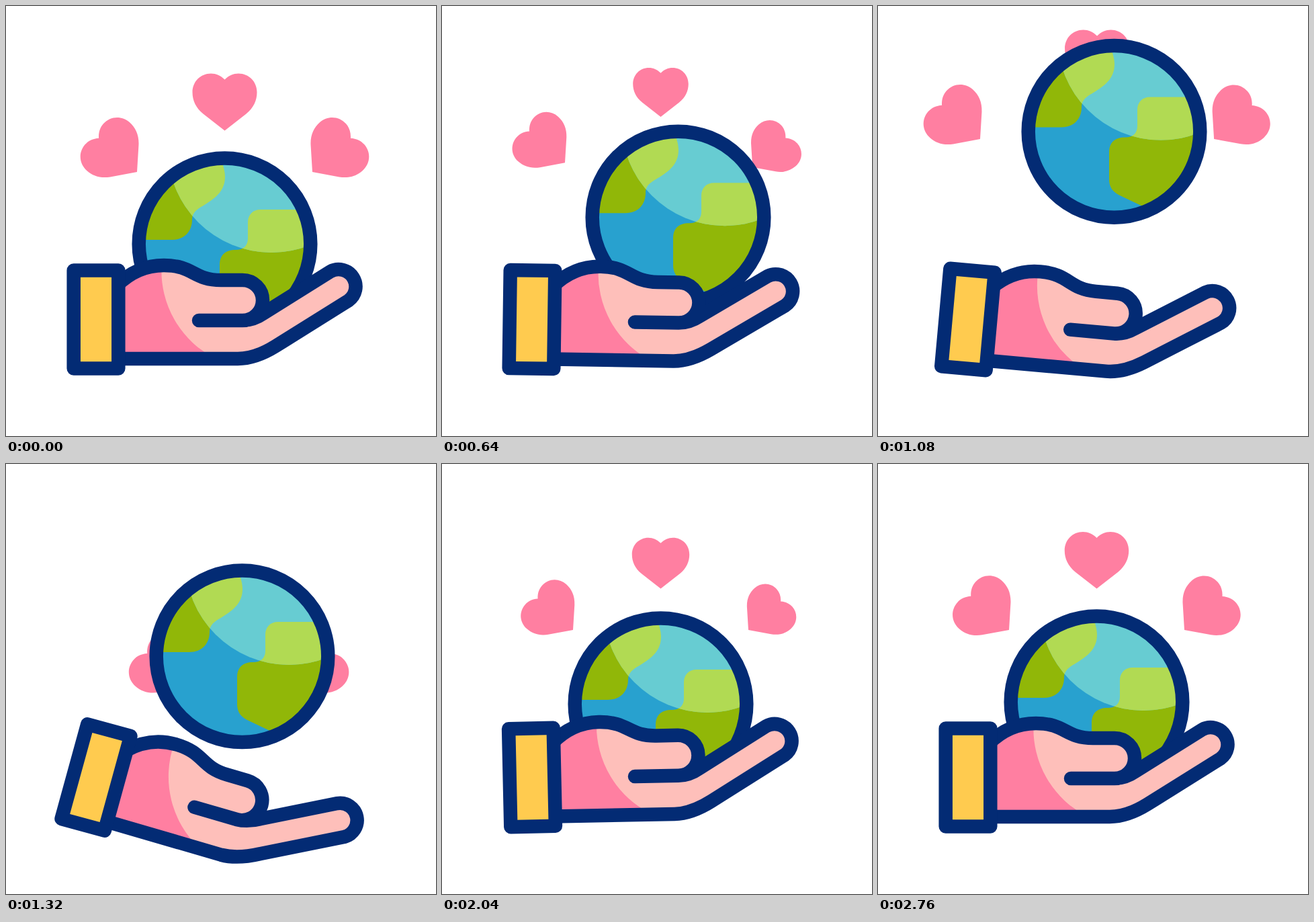
These frames come from a looping animation (640x640 px, 3000 ms). An HTML page:

```html
<!DOCTYPE html>
<html lang="en">
<head>
<meta charset="utf-8">
<title>Earth in a caring hand</title>
<style>
  html, body { margin: 0; width: 100%; height: 100%; overflow: hidden; background: #fff; }
  svg { display: block; width: 100%; height: 100%; }
  .line { fill: none; stroke: #032b74; stroke-width: 20.5; stroke-linejoin: round; stroke-linecap: round; }
  .heart { fill: #ff7fa1; }
</style>
</head>
<body>
<svg viewBox="0 0 640 640">
  <defs>
    <path id="heart" d="M0 0L-32-25C-43-34-48-45-48-57C-48-73-36-85-20.5-85C-13-85-6-82 0-76C6-82 13-85 20.5-85C36-85 48-73 48-57C48-45 43-34 32-25Z"/>
    <g id="land">
      <path d="M200 348H247C267 348 277 334 277 318C277 304 290 300 300 293C312 285 326 275 326 254C326 245 323 238 321 230H200Z"/>
      <path d="M460 303H379C367 303 360 311 360 322V346C360 357 353 363 342 363C326 363 318 371 318 385V425C318 436 322 443 333 449L375 469L460 460Z"/>
    </g>
    <clipPath id="ball"><circle cx="325.5" cy="354.3" r="123"/></clipPath>
    <clipPath id="shine"><circle cx="395" cy="213" r="154"/></clipPath>
  </defs>

  <use class="heart" href="#heart"/>
  <use class="heart" href="#heart"/>
  <use class="heart" href="#heart"/>

  <g id="globe">
    <g clip-path="url(#ball)">
      <circle cx="325.5" cy="354.3" r="123" fill="#28a1cf"/>
      <use href="#land" fill="#91b708"/>
      <g clip-path="url(#shine)">
        <circle cx="325.5" cy="354.3" r="123" fill="#67ccd2"/>
        <use href="#land" fill="#b1da53"/>
      </g>
    </g>
    <circle class="line" cx="325.5" cy="354.3" r="127.8"/>
  </g>

  <g id="hand">
    <path id="skin" fill="#febfba"/>
    <path fill="#ff7fa1" d="M165 416C185 396 209 386 231.6 386A146.6 146.6 0 0 0 312 525H165Z"/>
    <path id="outline" class="line"/>
  </g>
  <g id="cuff">
    <rect class="line" x="100.7" y="393.5" width="66.6" height="146" style="fill:#ffcb4f"/>
  </g>
</svg>
<script>
const LOOP = 3000, STEP = 40, END = 2760;
const $ = id => document.getElementById(id);
const move = (el, transform) => el.setAttribute('transform', transform);
const mix = (a, b, u) => a + (b - a) * u;

// Eased progress from 0 to 1 between two times.
const ease = (t, from, to) => {
  const u = Math.min(1, Math.max(0, (t - from) / (to - from)));
  return (1 - Math.cos(Math.PI * u)) / 2;
};

// Wrist and finger angles: dip, throw, catch, overshoot, settle.
const poses = [
  { at: 0, wrist: 0, finger: 0 },
  { at: 450, wrist: 16.3, finger: 13.5 },
  { at: 760, wrist: -6.7, finger: -5.6 },
  { at: 1380, wrist: 15.9, finger: 4.6 },
  { at: 1710, wrist: -3.1, finger: 2.1 },
  { at: 2300, wrist: 0, finger: 0 }
];

function poseAt(t) {
  const i = poses.findLastIndex(p => p.at <= t);
  const a = poses[i], b = poses[i + 1] || a;
  const u = a === b ? 0 : ease(t, a.at, b.at);
  return { wrist: mix(a.wrist, b.wrist, u), finger: mix(a.finger, b.finger, u) };
}

// The globe dips with the hand, flies on a parabola and is caught.
const THROW = 493, CATCH = 1490, APEX = 1000;
const globeX = t => 26 * (ease(t, 0, 450) - ease(t, CATCH, 1720));
function globeY(t) {
  if (t < THROW) return 92 * ease(t, 0, 450);
  const flight = -174 + 0.001035 * (Math.min(t, CATCH) - APEX) ** 2;
  return mix(flight, 2.9, ease(t, CATCH, 1720)) - 2.9 * ease(t, 2040, 2600);
}

// Hearts beat, burst outward, drop into the globe and grow back.
const hearts = [-1, 0, 1].map((side, i) => ({
  side,
  node: document.querySelectorAll('.heart')[i],
  x: 325.5 + side * 130.5,
  y: side ? 247 : 185.5,
  turn: side * 48.5,
  launch: [490, 480, 535][i]
}));

function drawHeart(h, t) {
  let { x, y } = h, size;
  if (t < 1600) {
    const beat = ease(t, 150 * (h.side + 1), 150 * (h.side + 1) + 840);
    const out = 70 * ease(t, h.launch, h.launch + 440);
    const aim = h.turn * 0.85 * Math.PI / 180;
    const fall = ease(t, 1040, 1540);
    x = mix(x + out * Math.sin(aim), 361 + 13 * h.side, fall);
    y = mix(y - out * Math.cos(aim), 427, fall);
    const phase = Math.acos(1 - 2 * beat);
    size = (1 - 0.15 * Math.sin(phase) ** 2) * (1 - ease(t, 1450, 1550));
  } else {
    const late = t - 80 * h.side;
    size = (1 - 0.11 * Math.exp((2040 - late) / 235)) * ease(t, 1740, 1900);
  }
  move(h.node, `translate(${x} ${y}) rotate(${h.turn}) scale(${size})`);
}

// Hand outline; the finger turns around a knuckle inside the palm.
function handPath(bend) {
  const at = (x, y, part = 1) => {
    const a = bend * part * Math.PI / 180, c = Math.cos(a), s = Math.sin(a);
    const px = x - 387, py = y - 493;
    return (387 + px * c - py * s).toFixed(2) + ' ' + (493 + px * s + py * c).toFixed(2);
  };
  return 'M165 416C185 396 209 386 235 386C279 386 279 408 320 408H352' +
    'A30 30 0 0 1 352 468H287H352' +
    `Q${at(368, 468, 0.5)} ${at(383, 457.6)}L${at(482.5, 395.4)}` +
    `A25.5 25.5 0 0 1 ${at(509.5, 438.6)}L${at(401, 506.4)}` +
    `Q${at(371, 525, 0.5)} 345 525H165`;
}

function draw(t) {
  const { wrist, finger } = poseAt(t), d = handPath(finger);
  move($('cuff'), `rotate(${wrist} 134 466.5)`);
  move($('hand'), `rotate(${wrist + 0.2 * finger} 134 466.5)`);
  $('skin').setAttribute('d', d);
  $('outline').setAttribute('d', d);
  move($('globe'), `translate(${globeX(t)} ${globeY(t)})`);
  hearts.forEach(h => drawHeart(h, t));
}

const start = performance.now();
function tick() {
  const t = (performance.now() - start) % LOOP;
  draw(Math.min(END, Math.floor(t / STEP) * STEP));
  requestAnimationFrame(tick);
}
tick();
</script>
</body>
</html>
```
